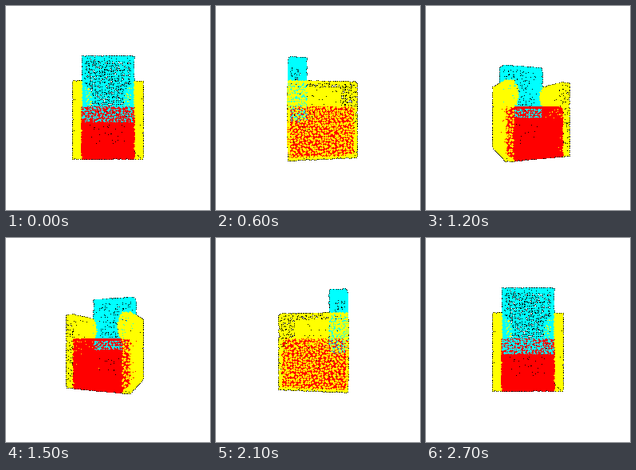
A matplotlib script that plays this animation: 256x256 px, repeating every 3000 ms.

```python
import numpy as np
import matplotlib.pyplot as plt
from matplotlib.animation import FuncAnimation

SIZE = 256
STEPS = 10
CAMERA = 238.0            # camera distance, in pixels at the turning axis
SPACING = 2.65            # mean distance between neighbouring points
JITTER = 0.8              # share of its cell a point may wander in

YELLOW, CYAN, RED = (255, 255, 0), (0, 255, 255), (255, 0, 0)

HALF_W, HALF_D = 37.0, 36.8
SEAT_W, SEAT_D = 28.0, 36.0   # half width and depth of seat and back
BACK_Z = 18.0                 # front plane of the back rest
FLOOR, BASE_TOP, SEAT_TOP, ARM_TOP, BACK_TOP = -54.0, -14.4, 0.5, 28.0, 55.0

rng = np.random.default_rng(7)


def patch(origin, u, v):
    """Evenly spread, jittered points on a rectangle."""
    origin, u, v = (np.array(a, float) for a in (origin, u, v))
    nu, nv = (max(1, round(np.linalg.norm(e) / SPACING)) for e in (u, v))
    cells = np.stack(np.meshgrid(np.arange(nu), np.arange(nv)), -1).reshape(-1, 2)
    cells = cells + 0.5 + JITTER * (rng.random(cells.shape) - 0.5)
    return origin + cells[:, :1] / nu * u + cells[:, 1:] / nv * v


def box(lo, hi):
    """Points on the six faces of a box."""
    lo, hi = np.array(lo, float), np.array(hi, float)
    edges = np.diag(hi - lo)
    faces = []
    for i, j in ((0, 1), (1, 2), (2, 0)):
        faces.append(patch(lo, edges[i], edges[j]))
        faces.append(patch(hi, -edges[i], -edges[j]))
    return np.vstack(faces)


def inner_edge(y):
    """Inner side of the arm: straight below the seat top, rolled above."""
    t = np.clip((y - 14.2) / 13.8, -1, 1)
    return np.where(y < SEAT_TOP, SEAT_W + 0.8, 33 - 9 * (1 - t * t) ** 0.35)


def arm(side):
    height, depth = ARM_TOP - FLOOR, 2 * HALF_D
    thick = HALF_W - SEAT_W
    corner = (SEAT_W, FLOOR, -HALF_D)
    outer = patch((HALF_W, FLOOR, -HALF_D), (0, height, 0), (0, 0, depth))
    inner = patch((SEAT_W + 0.8, SEAT_TOP, -HALF_D),
                  (0, ARM_TOP - SEAT_TOP, 0), (0, 0, depth))
    rolled = inner[:, 2] < BACK_Z
    inner[rolled, 0] = inner_edge(inner[rolled, 1])
    front = patch(corner, (thick, 0, 0), (0, height, 0))
    edge = inner_edge(front[:, 1])
    front[:, 0] = edge + (HALF_W - edge) * (front[:, 0] - SEAT_W) / thick
    rear = patch((SEAT_W, FLOOR, HALF_D), (thick, 0, 0), (0, height, 0))
    bottom = patch(corner, (thick, 0, 0), (0, 0, depth))
    top = patch((SEAT_W, ARM_TOP, -HALF_D), (thick, 0, 0), (0, 0, depth))
    return np.vstack([outer, inner, front, rear, bottom, top]) * (side, 1, 1)


parts = [
    (arm(-1), YELLOW),
    (arm(1), YELLOW),
    (box((-SEAT_W + 0.8, BASE_TOP, BACK_Z), (SEAT_W - 0.8, BACK_TOP, SEAT_D)), CYAN),
    (box((-SEAT_W, FLOOR, -HALF_D), (SEAT_W, BASE_TOP, SEAT_D)), RED),
    (box((-SEAT_W, FLOOR, -HALF_D), (SEAT_W, SEAT_TOP, SEAT_D)), RED),
]
points = np.vstack([p for p, _ in parts])
colors = np.vstack([np.tile(c, (len(p), 1)) for p, c in parts]).astype(np.uint8)

DOT = np.array([(0, 0), (1, 0), (-1, 0), (0, 1), (0, -1)])
CORNERS = np.array([(1, 1), (1, -1), (-1, 1), (-1, -1)])


def render(angle):
    c, s = np.cos(angle), np.sin(angle)
    x, y, z = points.T
    depth = x * s + z * c
    scale = CAMERA / (CAMERA - depth)
    col = SIZE / 2 + (x * c - z * s) * scale
    row = SIZE / 2 - y * scale
    order = np.argsort(depth)
    pixels = np.floor(np.column_stack([row, col])[order]).astype(int)

    image = np.full((SIZE, SIZE, 3), 255, np.uint8)
    halo = (pixels[:, None] + CORNERS).reshape(-1, 2)
    image[halo[:, 0], halo[:, 1]] = 0
    # far to near, so the nearest dot is written last
    dots = (pixels[:, None] + DOT).reshape(-1, 2)
    image[dots[:, 0], dots[:, 1]] = np.repeat(colors[order], len(DOT), axis=0)
    return image


fig = plt.figure(figsize=(SIZE / 100, SIZE / 100), dpi=100, facecolor="white")
ax = fig.add_axes([0, 0, 1, 1])
ax.axis("off")
picture = ax.imshow(render(0), interpolation="nearest", aspect="auto")


def update(step):
    # a full turn whose last step repeats the first pose
    picture.set_data(render(2 * np.pi * step / (STEPS - 1)))
    return (picture,)


animation = FuncAnimation(fig, update, frames=STEPS, interval=300,
                          repeat=True, repeat_delay=0)
plt.show()
```
